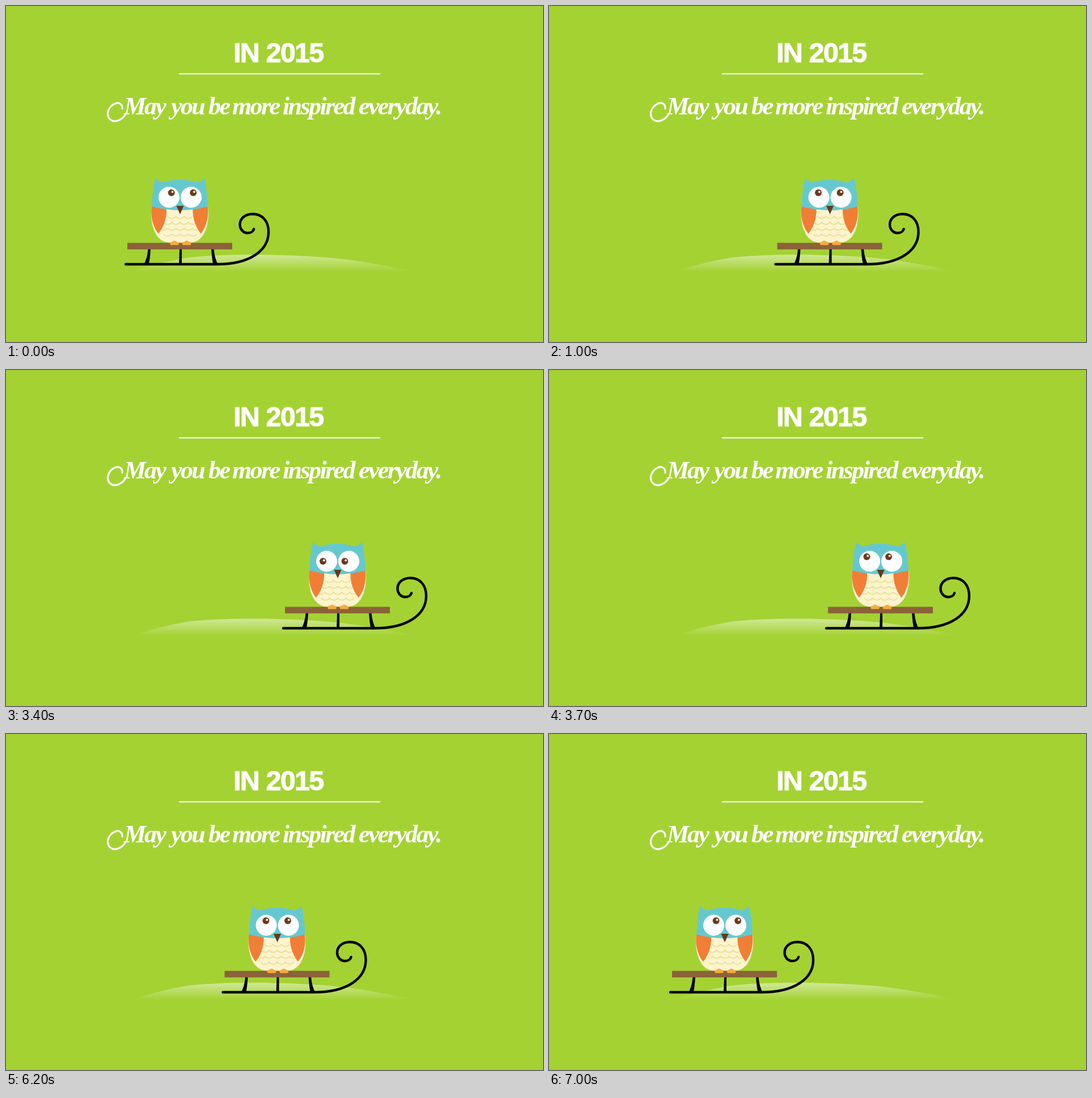
Recreate the animation shown at these times as an HTML page. Size 947 by 592 pixels, loop 8000 ms.

```html
<!DOCTYPE html>
<html lang="en">
<head>
<meta charset="utf-8">
<title>In 2015</title>
<style>
  html, body { margin: 0; width: 100%; height: 100%; overflow: hidden; background: #a4d233; }
  svg { display: block; width: 947px; height: 592px; }
  .year { font: bold 48.5px "Liberation Sans", Arial, sans-serif; letter-spacing: -1.7px; stroke: #fff; stroke-width: 1; }
  .wish { font: italic bold 44px "Liberation Serif", "Times New Roman", serif; letter-spacing: -2.6px; }
</style>
</head>
<body>
<svg viewBox="0 0 947 592">
  <defs>
    <linearGradient id="snow" gradientUnits="userSpaceOnUse" x1="0" y1="437" x2="0" y2="468">
      <stop offset="0" stop-color="#fff" stop-opacity=".5"/>
      <stop offset="1" stop-color="#fff" stop-opacity="0"/>
    </linearGradient>
    <path id="wing" fill="#f07e37" d="M257 352C254 374 261 392 269 401C278 390 284 373 283 357Q268 356 257 352Z"/>
    <path id="leg" d="M250.5 428H255Q254 445 251.5 456H242.5Q249 446 250.5 428Z"/>
    <g id="foot" fill="#f5ab3f">
      <ellipse cx="-4.6" cy="1" rx="3.2" ry="3"/>
      <ellipse cx="4.6" cy="1" rx="3.2" ry="3"/>
      <ellipse rx="4.6" ry="4"/>
    </g>
    <g id="pupil">
      <circle r="6" fill="#6b3b1c"/>
      <circle cx="1.8" cy="-1.6" r="1.9" fill="#fff"/>
    </g>
  </defs>

  <g fill="#fff">
    <text class="year" y="99"><tspan x="401">IN</tspan> <tspan x="458.5">2015</tspan></text>
    <rect x="305" y="118.5" width="355" height="2"/>
    <text class="wish" y="191"><tspan x="208">M</tspan><tspan x="244">ay</tspan> <tspan x="291">you</tspan> <tspan x="357">be</tspan> <tspan x="399">more</tspan> <tspan x="488">inspired</tspan> <tspan x="622">everyday.</tspan></text>
    <path fill="none" stroke="#fff" stroke-width="3.2" stroke-linecap="round"
      d="M205 181C206 173 199 169 192 172C181 177 176 190 182 198C189 207 204 203 212 189"/>
  </g>

  <path fill="url(#snow)" d="M218 469Q270 452 320 443.5C390 435 530 437 610 448Q660 455 724 469Z"/>

  <g id="rider">
    <use href="#leg"/>
    <use href="#leg" transform="matrix(-1 0 0 1 617 0)"/>
    <path d="M306 428h4v28h-5Z"/>
    <path fill="none" stroke="#000" stroke-width="4.4" stroke-linecap="round"
      d="M211 455H372C430 455 463 431 463 398C463 379 452 366.5 435 366.5C421 366.5 412.5 375 412.5 385C412.5 394 419 400 426 400C432 400 436 397 437 393"/>
    <rect x="214" y="417.3" width="185" height="11.5" fill="#8c6239"/>

    <path fill="#fdf3cd" d="M257 352C253 385 263 417 289 417H324C350 417 360 385 356 352Z"/>
    <path id="feathers" fill="none" stroke="#d8db7a" stroke-width="1.2"/>
    <use href="#wing"/>
    <use href="#wing" transform="matrix(-1 0 0 1 612.5 0)"/>
    <path fill="#66c8cf" d="M263 303.5Q269 308.5 276 311Q306 301 337 311Q344 308.5 350 303.5Q355 328 356 353Q307 367 257 353Q258 328 263 303.5Z"/>
    <circle cx="287.5" cy="337" r="18.5" fill="#fff"/>
    <circle cx="326.5" cy="337" r="18.5" fill="#fff"/>
    <path fill="#623a1c" d="M300.5 352h13l-6.5 15Z"/>
    <g id="gaze">
      <use href="#pupil"/>
      <use href="#pupil" x="38.5"/>
    </g>
    <use href="#foot" x="297" y="417.5"/>
    <use href="#foot" x="318.5" y="417.5"/>
  </g>
</svg>
<script>
const LOOP = 8000, TICK = 100;
const $ = id => document.getElementById(id);

// Knots: tick, position, speed per tick
const out = [[0, 0, 8], [9, 153, 30], [10, 188.5, 33], [14, 278, 10]];
const back = [[56, 278, -10], [57, 267, -15], [62, 171.5, -20.5], [65, 106, -23], [70, 3, -14]];
const roll = { 34: [-3, 8], 35: [-2, 16], 36: [-4, 8] };

function glide(knots, n) {
  const i = knots.findIndex(k => k[0] > n);
  if (i < 0) return knots[knots.length - 1][1];
  const [n0, p0, v0] = knots[i - 1], [n1, p1, v1] = knots[i];
  const d = n1 - n0, u = (n - n0) / d, w = 1 - u;
  return w * w * (p0 * (1 + 2 * u) + v0 * d * u) + u * u * (p1 * (1 + 2 * w) - v1 * d * w);
}

function glance(n) {
  return roll[n] || (n > 36 && n < 57 ? [-1.5, 0] : [0, 0]);
}

$("feathers").setAttribute("d", [3, 4, 5, 4].map((count, row) =>
  `M${307 - count * 7.25} ${370.5 + row * 10.4}` + "c3 5 11.5 5 14.5 0".repeat(count)).join(""));

function draw() {
  const n = Math.floor(performance.now() % LOOP / TICK);
  const x = glide(n < 56 ? out : back, n);
  const [dx, dy] = glance(n);
  $("rider").setAttribute("transform", `translate(${x} 0)`);
  $("gaze").setAttribute("transform", `translate(${291.7 - x * 0.028 + dx} ${329 + dy})`);
  requestAnimationFrame(draw);
}
draw();
</script>
</body>
</html>
```
